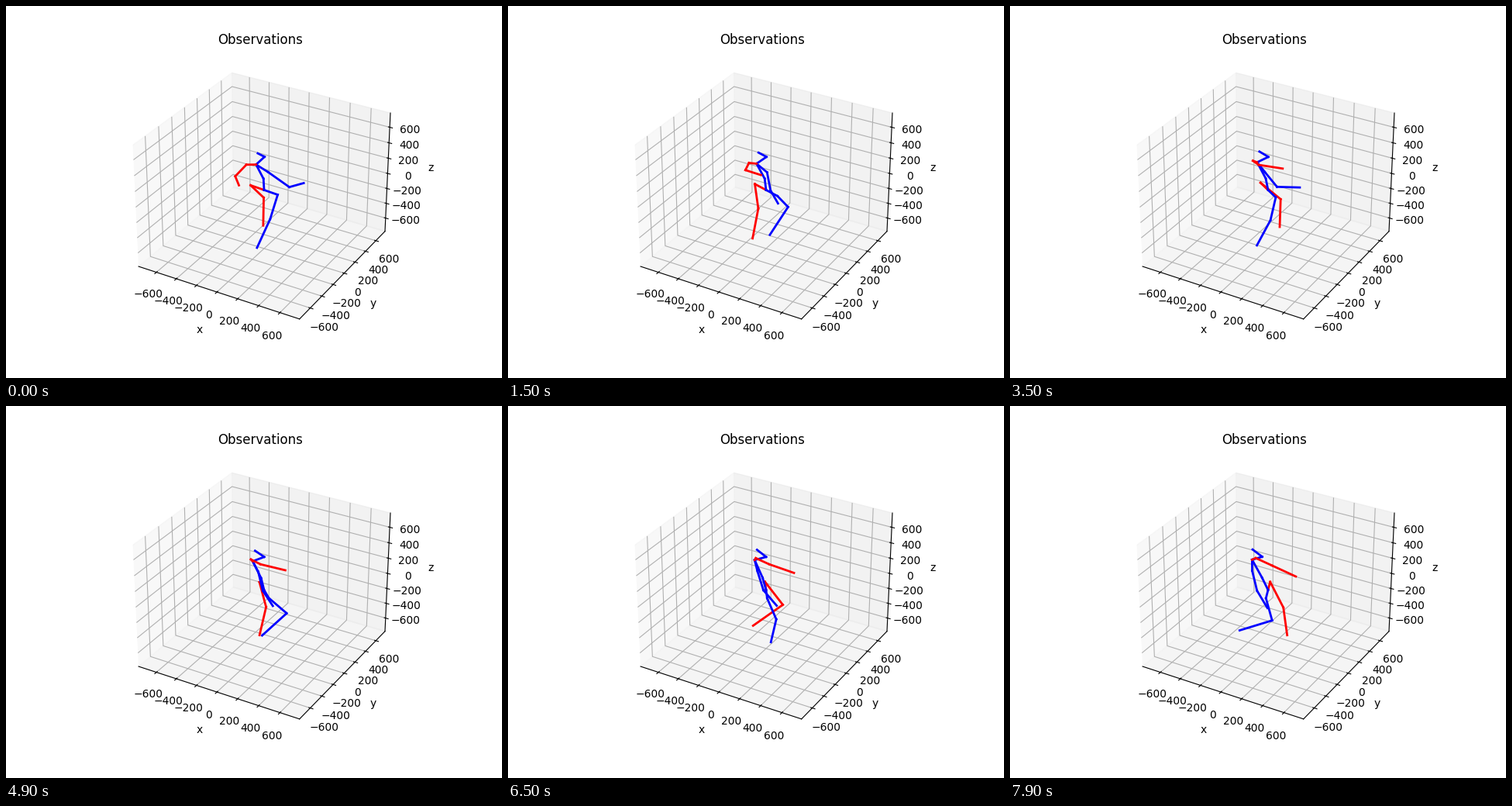
These frames come from a looping animation (640x480 px, 8 s). A matplotlib script:

```python
import numpy as np
import matplotlib.pyplot as plt
from matplotlib.animation import FuncAnimation

FPS, N_FRAMES = 10, 80
STRIDE = 3.5       # seconds per full gait cycle
SPACE = 750        # half width of the room
THIGH, SHIN, UPPER_ARM, FOREARM = 348, 372, 255, 235
HIP, SHOULDER = 140, 111

CHAINS = [
    ("red", "root r_hip r_knee r_foot"),
    ("blue", "root l_hip l_knee l_foot"),
    ("blue", "root spine neck nose head"),
    ("blue", "neck l_shoulder l_elbow l_wrist"),
    ("red", "neck r_shoulder r_elbow r_wrist"),
]


def ease(x):
    x = np.clip(x, 0, 1)
    return x * x * (3 - 2 * x)


def wave(phase, mean, c1, s1, c2, s2):
    """Two-harmonic joint angle over one stride."""
    p = 2 * np.pi * phase
    return (mean + c1 * np.cos(p) + s1 * np.sin(p)
            + c2 * np.cos(2 * p) + s2 * np.sin(2 * p))


def limb(length, swing, out=0, side=1):
    """Hanging segment, swung forward and out to one side, in degrees."""
    s, o = np.radians([swing, out])
    return length * np.array([side * np.sin(o), np.cos(o) * np.sin(s),
                              -np.cos(o) * np.cos(s)])


def lean_back(point, angle):
    x, y, z = point
    c, s = np.cos(np.radians(angle)), np.sin(np.radians(angle))
    return np.array([x, y * c - z * s, y * s + z * c])


def pose(t):
    """Joints at time t; body axes are sideways, forward, up."""
    phase = (t - 0.25) / STRIDE
    j = {"root": np.zeros(3)}

    for key, side, ph, out in (("r", -1, phase, 0), ("l", 1, phase + 0.5, -11)):
        thigh = wave(ph, 14.3, 19.5, -1.9, -4, -5.1)
        shin = wave(ph, -15.6, 19, 23.6, 11, -0.8)
        j[key + "_hip"] = np.array([side * HIP, 0, 0])
        j[key + "_knee"] = j[key + "_hip"] + limb(THIGH, thigh, out, side)
        j[key + "_foot"] = j[key + "_knee"] + limb(SHIN, shin, out, side)

    lean = 6.5 * ease((t - 6.5) / 1.4)
    torso = {"spine": (15, -30, 171), "neck": (-15, -95, 380),
             "nose": (5, 0, 430), "head": (-12, -75, 512)}
    for key, point in torso.items():
        j[key] = lean_back(point, lean)

    lift = ease(t / 2.8)
    pump = max(0, np.cos(2 * np.pi * (phase + 0.05))) ** 3
    arms = (("r", -1, 5 + 29 * lift, 31, 28 + 38 * lift, 10 - 20 * lift),
            ("l", 1, 9 + 18 * pump, 37 * (1 - ease(t / 1.5)), 22 + 48 * pump, 0))
    for key, side, swing, out, bend, turn in arms:
        j[key + "_shoulder"] = j["neck"] + [side * SHOULDER, 16, -58]
        j[key + "_elbow"] = j[key + "_shoulder"] + limb(UPPER_ARM, swing, out, side)
        j[key + "_wrist"] = j[key + "_elbow"] + limb(FOREARM, bend, turn, side)

    # The walker turns slowly clockwise on the spot.
    a = np.radians(-4.9 - 7.9 * t)
    turn = np.array([[np.cos(a), -np.sin(a), 0], [np.sin(a), np.cos(a), 0], [0, 0, 1]])
    return {key: turn @ p for key, p in j.items()}


fig = plt.figure(figsize=(6.4, 4.8), dpi=100)
room = fig.add_subplot(projection="3d")
room.set_title("Observations")

bones = []
for color, chain in CHAINS:
    names = chain.split()
    for a, b in zip(names, names[1:]):
        line, = room.plot([0, 0], [0, 0], [0, 0], color=color, lw=2)
        bones.append((line, a, b))

half = SPACE * 25 / 24
for name in "xyz":
    room.set(**{f"{name}lim": (-half, half), f"{name}label": name,
                f"{name}ticks": range(-600, 601, 200)})


def update(i):
    j = pose(i / FPS)
    for line, a, b in bones:
        line.set_data_3d(*zip(j[a], j[b]))
    return [line for line, _, _ in bones]


anim = FuncAnimation(fig, update, frames=N_FRAMES, interval=1000 / FPS,
                     repeat=True, repeat_delay=0)
plt.show()
```
